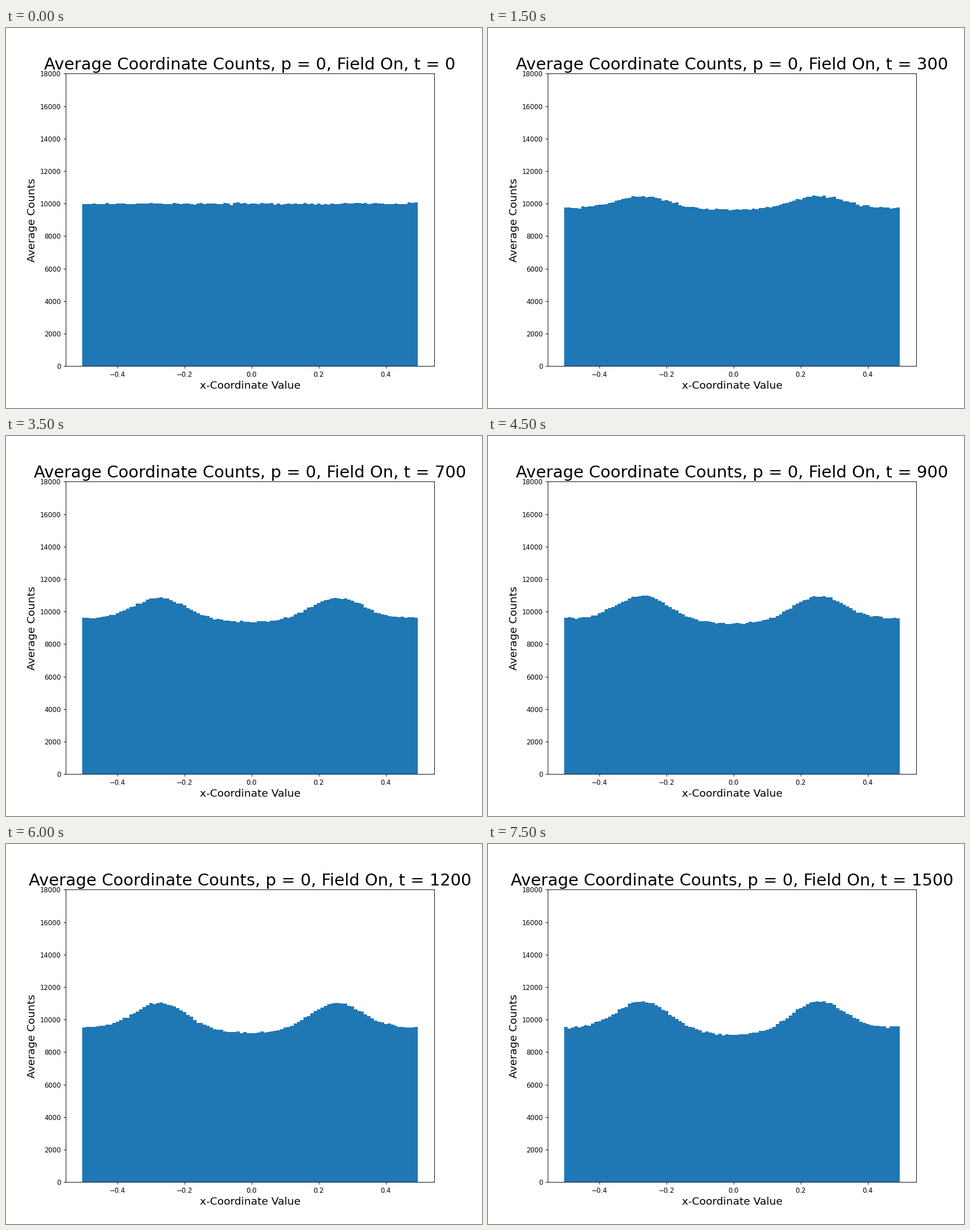
A matplotlib script for the animation above (8 s loop, 837 by 669 pixels).

```python
import numpy as np
import matplotlib.pyplot as plt
from matplotlib.animation import FuncAnimation

FRAMES = 16
INTERVAL = 500   # ms per frame
STEP = 100       # simulation time per frame
BINS = 100

# Strength of each feature, relative to a uniform count, over simulation time
TIMES = [0, 100, 300, 500, 900, 1200, 1500]
CENTRE_DIP = [0, 185, 380, 540, 760, 850, 950]
EDGE_DIP = [0, 85, 255, 345, 415, 480, 490]
PEAK_RISE = [0, 175, 465, 720, 950, 1035, 1125]

PEAK_POS, PEAK_WIDTH = 0.262, 0.111

x = -0.5 + np.arange(BINS) / BINS
dist = np.abs(x + 0.008)


def counts(frame):
    """Two Gaussian bumps on a shallow V, plus counting noise."""
    t = frame * STEP
    centre, edge, peak = (np.interp(t, TIMES, v)
                          for v in (CENTRE_DIP, EDGE_DIP, PEAK_RISE))

    def base(d):
        return -centre + (centre - edge) * 2 * d

    bump = np.exp(-((dist - PEAK_POS) / PEAK_WIDTH) ** 2)
    noise = np.random.default_rng(40 + frame).normal(0, 32, BINS)
    return 10000 + base(dist) + (peak - base(PEAK_POS)) * bump + noise


plt.rcParams["font.family"] = "DejaVu Sans"
fig, ax = plt.subplots(figsize=(10.009, 8), dpi=83.625)
fig.subplots_adjust(left=0.125, right=0.9, bottom=0.11, top=0.88)

bars = ax.bar(x, counts(0), width=1 / BINS, color="#1f77b4")
ax.set_xlim(-0.555, 0.545)
ax.set_ylim(0, 18000)
ax.set_xlabel("x-Coordinate Value", fontsize=16)
ax.set_ylabel("Average Counts", fontsize=16)
title = ax.set_title("", fontsize=25)


def update(frame):
    for bar, height in zip(bars, counts(frame)):
        bar.set_height(height)
    title.set_text(
        f"Average Coordinate Counts, p = 0, Field On, t = {frame * STEP}")
    return [*bars, title]


anim = FuncAnimation(fig, update, frames=FRAMES, interval=INTERVAL,
                     repeat=True, repeat_delay=0, blit=False)
plt.show()
```
